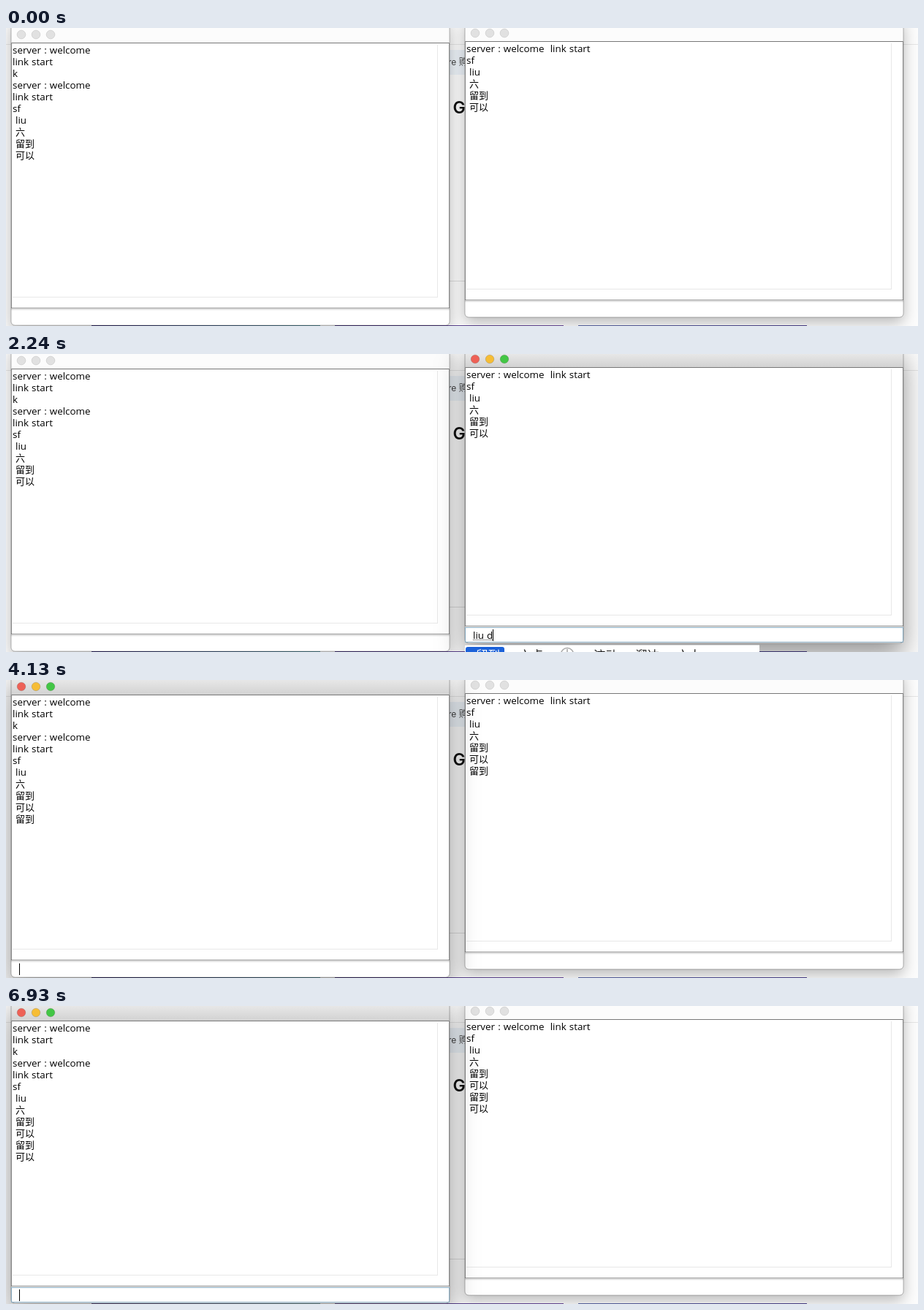
Animation of 1248 by 408 pixels, one loop 7210 ms. Source, as an HTML page with a canvas:

```html
<!DOCTYPE html>
<html lang="zh">
<meta charset="utf-8">
<title>Chat windows</title>
<style>
  html, body { margin: 0; height: 100%; overflow: hidden; background: #fff; }
  canvas { display: block; }
</style>
<canvas id="stage" width="1248" height="408"></canvas>
<script>
const ctx = document.getElementById('stage').getContext('2d');
const LOOP = 7210;
const LATIN = '13.4px "Open Sans", "Noto Sans", sans-serif';
const CJK = '13px "Noto Sans CJK SC", "Noto Sans CJK", sans-serif';

const LEFT = { x: 7, top: 20, logEnd: 383 };
const RIGHT = { x: 628, top: 18, logEnd: 372 };
const leftLog = ['server : welcome', 'link start', 'k', 'server : welcome', 'link start', 'sf', ' liu', ' 六', ' 留到', ' 可以'];
const rightLog = ['server : welcome  link start', 'sf', ' liu', ' 六', ' 留到', ' 可以'];
const sent = [[2870, ' 留到'], [5880, ' 可以']];

// Input contents: [start ms, text, still composing]
const rightTyping = [[0, ''], [1750, 'l', true], [1890, 'li', true], [1960, 'liu', true], [2170, 'liu d', true], [2450, '留到'], [2870, '']];
const leftTyping = [[0, ''], [4900, 'k', true], [5040, 'ke', true], [5180, 'ke y', true], [5320, 'ke yi', true], [5460, '可以'], [5880, '']];
const caretHidden = [[1120, 1680], [3360, 3920], [4760, 4900], [6370, 6930]];
const candidates = {
  l: ['了', '来', '里', '两', '老'],
  li: ['里', '离', '力', '立', '李'],
  liu: ['六', '留', '流', '刘', '溜'],
  'liu d': ['留到', '六点', '流动', '溜达', '六大']
};

const within = (t, [from, to]) => t >= from && t < to;
const stateAt = (list, t) => list.filter(item => item[0] <= t).pop();

function rect(x, y, w, h, color) {
  ctx.fillStyle = color;
  ctx.fillRect(x, y, w, h);
}

function text(str, x, y, font, color = '#000') {
  ctx.font = font;
  ctx.fillStyle = color;
  ctx.fillText(str, x, y);
  return ctx.measureText(str).width;
}

function line(str, x, y) {
  const indent = str[0] === ' ' ? 4 : 0;
  const wide = /[\u4e00-\u9fff]/.test(str);
  ctx.wordSpacing = '0.6px';
  const width = text(str.trim(), x + indent, y, wide ? CJK : LATIN);
  ctx.wordSpacing = '0px';
  return width;
}

function gradient(x0, y0, x1, y1, from, to) {
  const g = ctx.createLinearGradient(x0, y0, x1, y1);
  g.addColorStop(0, from);
  g.addColorStop(1, to);
  return g;
}

function drawPage() {
  rect(0, 0, 1248, 408, '#fdfdfd');
  rect(0, 22, 1248, 1, '#e6e6e6');
  rect(600, 30, 40, 34, '#edf3f9');
  text('re 购', 605, 51, '12px Inter, "Noto Sans CJK SC", sans-serif', '#444');
  text('G', 611.5, 117, '600 23px Inter, sans-serif', '#111');
  rect(600, 346, 40, 1, '#dcdcdc');
  [['#342b70', '#5893a0'], ['#4a3a86', '#6a4a9c'], ['#5a68a8', '#4a3f8c']].forEach(([from, to], i) => {
    const x = 117 + i * 333;
    rect(x, 407, 313, 1, gradient(x, 0, x + 313, 0, from, to));
  });
}

function windowPath({ x, logEnd }) {
  ctx.beginPath();
  ctx.roundRect(x, -12, 600, logEnd + 36, 5);
}

function drawWindow(win, active, log, typing, caretOn, ring) {
  const { x, top, logEnd } = win;
  ctx.save();
  ctx.shadowColor = active ? 'rgba(0,0,0,.42)' : 'rgba(0,0,0,.28)';
  ctx.shadowBlur = active ? 36 : 20;
  ctx.shadowOffsetY = active ? 16 : 7;
  windowPath(win);
  ctx.fillStyle = '#fff';
  ctx.fill();
  ctx.restore();

  ctx.save();
  windowPath(win);
  ctx.clip();
  rect(x, 0, 600, top, active ? gradient(0, 0, 0, top, '#e7e7e7', '#d2d2d2') : '#fcfcfc');
  ['#ee6156', '#f6bd35', '#43c645'].forEach((color, i) => {
    ctx.beginPath();
    ctx.arc(x + 14 + i * 20, top - 11, 5.8, 0, 7);
    ctx.fillStyle = active ? color : '#e1e1e1';
    ctx.fill();
    ctx.lineWidth = 0.8;
    ctx.strokeStyle = active ? 'rgba(0,0,0,.18)' : '#cfcfcf';
    ctx.stroke();
  });
  rect(x, top, 600, 1, '#777');
  rect(x + 583, top + 3, 1, logEnd - top - 18, '#e8e8e8');
  rect(x + 2, logEnd - 15, 582, 1, '#e8e8e8');
  rect(x, logEnd, 600, 1, '#888');
  rect(x, logEnd + 2, 600, 1, '#d0d0d0');
  log.forEach((entry, i) => line(entry, x + 2, top + 15 + i * 16));

  const [, content, composing] = typing;
  const width = line(content, x + 11, logEnd + 18);
  if (composing) {
    for (let dx = 0; dx < width; dx += 2) rect(x + 11 + dx, logEnd + 19, 1, 1, '#333');
  }
  if (active && caretOn) rect(x + 11 + Math.round(width), logEnd + 5, 1, 16, '#000');
  ctx.restore();

  windowPath(win);
  ctx.lineWidth = 1;
  ctx.strokeStyle = 'rgba(0,0,0,.28)';
  ctx.stroke();
  rect(x, top, 1, logEnd - top, '#888');
  rect(x + 599, top, 1, logEnd - top, '#888');
  if (ring) {
    ctx.strokeStyle = '#86a9bf';
    ctx.strokeRect(x + 0.5, logEnd + 2.5, 599, 20);
  }
}

function drawCandidates(words, alpha) {
  const font = '16.5px "Noto Sans CJK SC", "Noto Sans CJK", sans-serif';
  ctx.save();
  ctx.globalAlpha = alpha;
  rect(628, 398, 403, 10, '#fff');
  rect(628, 398, 403, 1, '#d5d5d5');
  ctx.fillStyle = '#1c62d9';
  ctx.beginPath();
  ctx.roundRect(629, 401, 53, 20, 3);
  ctx.fill();
  [643, 702, 804, 861, 918].forEach((x, i) => text(words[i], x, 419, font, i ? '#222' : '#fff'));
  ctx.beginPath();
  ctx.arc(768, 411, 8.5, 0, 7);
  ctx.moveTo(768, 411);
  ctx.lineTo(768, 404);
  ctx.lineWidth = 1.6;
  ctx.strokeStyle = '#aaa';
  ctx.stroke();
  ctx.restore();
}

function draw(now) {
  const t = now % LOOP;
  const messages = sent.filter(([at]) => t >= at).map(([, message]) => message);
  const caretOn = !caretHidden.some(span => within(t, span));
  const rightActive = within(t, [630, 4130]);
  const leftActive = t >= 4130;
  const typed = stateAt(rightTyping, t);

  drawPage();
  const paintLeft = () => drawWindow(LEFT, leftActive, leftLog.concat(messages), stateAt(leftTyping, t), caretOn, t >= 4900);
  const paintRight = () => drawWindow(RIGHT, rightActive, rightLog.concat(messages), typed, caretOn, within(t, [1750, 4130]));
  (leftActive ? [paintRight, paintLeft] : [paintLeft, paintRight]).forEach(paint => paint());

  if (within(t, [1750, 2660])) {
    const fade = t < 2450 ? 1 : 1 - (t - 2380) / 280;
    drawCandidates(candidates[typed[1]] || candidates['liu d'], fade);
  }
  requestAnimationFrame(frame);
}

const start = performance.now();
function frame() {
  draw(performance.now() - start);
}
frame();
</script>
</html>
```
